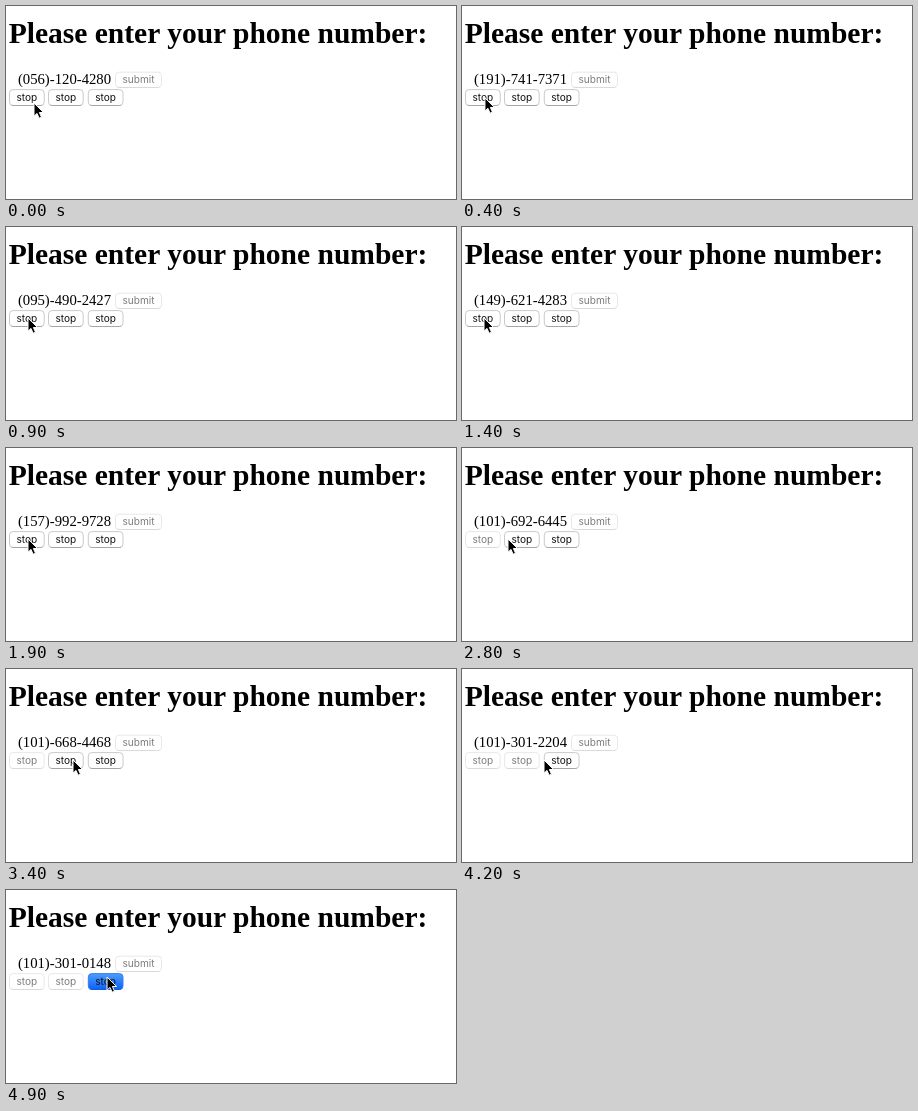
Write an HTML page that moves like this. It is 450 by 193 pixels and loops after 5000 ms.

```html
<!DOCTYPE html>
<html lang="en">
<head>
<meta charset="utf-8">
<title>Phone number picker</title>
<style>
  html, body { margin: 0; width: 100%; height: 100%; overflow: hidden; background: #fff; }
  svg { display: block; width: 100%; height: 100%; }
  .serif { font-family: "Liberation Serif", "Times New Roman", serif; fill: #000; }
  .button text { font: 10.1px Inter, "Liberation Sans", sans-serif; text-anchor: middle; fill: #111; }
  .face { fill: #fff; stroke: #c4c4c4; stroke-width: .9; }
  .shade { fill: none; stroke: #a2a2a2; stroke-width: .9; }
  .off text { fill: #7c7c7c; }
  .off .face { stroke: #e6e6e6; }
  .off .shade { stroke: #d8d8d8; }
  .down .face { fill: url(#blue); stroke: #2b7bf0; }
  .down .shade { stroke: #1257d8; }
</style>
</head>
<body>
<svg viewBox="0 0 450 193">
  <defs>
    <linearGradient id="blue" x2="0" y2="1">
      <stop offset="0" stop-color="#4e9dfb"/>
      <stop offset="1" stop-color="#0b61fb"/>
    </linearGradient>
  </defs>
  <text class="serif" x="2.7" y="37" font-size="29.52" font-weight="bold">Please enter your phone number:</text>
  <text class="serif" id="number" x="11.9" y="78" font-size="14.72"></text>
  <g id="buttons"></g>
  <path id="cursor" d="M0 0V13.2L3 10.4L5.1 15.2L7.5 14.2L5.4 9.5H9.6Z"
        fill="#000" stroke="#fff" stroke-width="1" stroke-linejoin="round"/>
</svg>
<script>
const LOOP = 5000, TICK = 100;
const $ = id => document.getElementById(id);

// Each reel spins until its button is released.
const reels = [
  { size: 2, press: 2100, release: 2300 },
  { size: 3, press: 3700, release: 3900 },
  { size: 4, press: 4900, release: LOOP }
];

// Cursor tip: time, x, y
const path = [
  [0, 28, 97], [100, 28, 97], [500, 22, 91], [2400, 22, 91], [2800, 46, 91],
  [3000, 52, 92], [3400, 67, 91], [3900, 67, 91], [4200, 82, 91],
  [4700, 101, 87], [LOOP, 101, 87]
];

function addButton(x, y, w, h, label) {
  const g = document.createElementNS("http://www.w3.org/2000/svg", "g");
  const bottom = y + h;
  g.innerHTML =
    `<rect class="face" x="${x}" y="${y}" width="${w}" height="${h}" rx="3.5"/>` +
    `<path class="shade" d="M${x + 2} ${bottom - .4}Q${x + 2.7} ${bottom} ${x + 3.5} ${bottom}H${x + w - 3.5}Q${x + w - 2.7} ${bottom} ${x + w - 2} ${bottom - .4}"/>` +
    `<text x="${x + w / 2}" y="${bottom - 4.4}">${label}</text>`;
  $("buttons").append(g);
  return g;
}

function digits(seed, size) {
  const r = Math.sin(seed * 12.9898 + size * 78.233) * 43758.5453;
  return String(Math.floor((r - Math.floor(r)) * 10 ** size)).padStart(size, "0");
}

function cursorAt(t) {
  const i = path.findIndex(p => p[0] > t);
  const [t0, x0, y0] = path[i - 1], [t1, x1, y1] = path[i];
  const k = (t - t0) / (t1 - t0), e = k * k * (3 - 2 * k);
  return [x0 + (x1 - x0) * e, y0 + (y1 - y0) * e];
}

addButton(109.5, 66.2, 46, 15.3, "submit").setAttribute("class", "button off");
const stops = [3.5, 42.5, 82.3].map(x => addButton(x, 83.6, 34.7, 15.9, "stop"));

function draw(time) {
  const t = Math.floor(time % LOOP / TICK) * TICK;
  const [area, middle, last] = reels.map(r =>
    digits(Math.min(t, r.release) / TICK + 7, r.size));
  const lead = Math.min(t, reels[0].release) / TICK % 3 ? 1 : 0;
  $("number").textContent = `(${lead}${area})-${middle}-${last}`;
  reels.forEach((r, i) => {
    const state = t >= r.release ? " off" : t >= r.press ? " down" : "";
    stops[i].setAttribute("class", "button" + state);
  });
  $("cursor").setAttribute("transform", `translate(${cursorAt(t)})`);
}

const start = performance.now();
function frame() {
  draw(performance.now() - start);
  requestAnimationFrame(frame);
}
frame();
</script>
</body>
</html>
```
